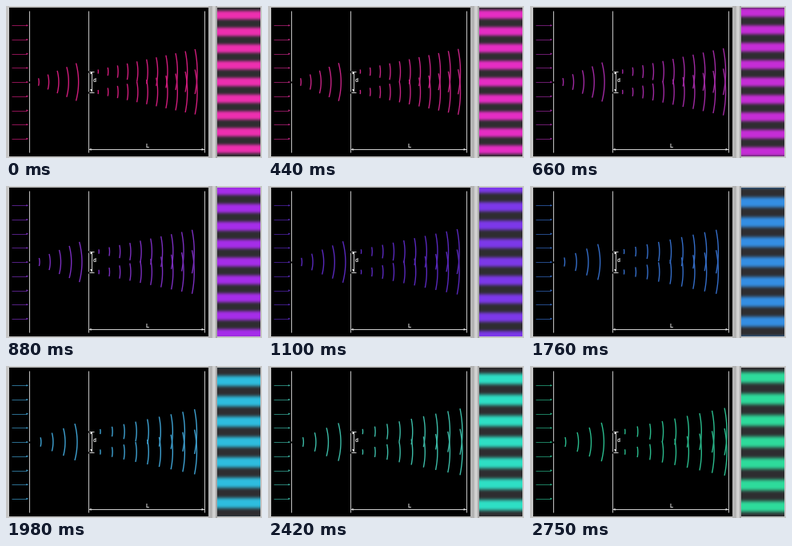
Recreate the animation shown at these times as a matplotlib script. Size 320 px wide and 190 px high, loop 2860 ms.

```python
import numpy as np
import matplotlib.pyplot as plt
from matplotlib.animation import FuncAnimation
from matplotlib.patches import Rectangle, Polygon

W, H, DPI = 320, 190, 100
FRAMES, STEP_MS = 26, 110
PX = 72 / DPI  # points per pixel

MID = 95
SCREEN_1, SCREEN_2, SCREEN_3 = 28.8, 103, 248
SLITS = (82, 107.5)
GREY, INK = "#b4b4b4", "#e4e4e4"
DARK = np.array([46, 45, 48]) / 255

# Key times with wavelength, wave colour and fringe colour
KEYS = [0, 4, 8, 13, 18, 22, 25]
WAVELENGTH = [12.37, 12.5, 13.23, 14.2, 15.05, 15.55, 15.9]
WAVE_RGB = np.array([(205, 28, 122), (196, 36, 132), (122, 46, 190), (38, 30, 182),
                     (62, 160, 208), (60, 186, 166), (42, 186, 140)]) / 255
FRINGE_RGB = np.array([(238, 48, 176), (230, 46, 196), (166, 46, 234), (62, 72, 234),
                       (46, 190, 224), (46, 224, 198), (46, 220, 156)]) / 255

fig = plt.figure(figsize=(W / DPI, H / DPI), dpi=DPI, facecolor="#c6c6c6")
ax = fig.add_axes([0, 0, 1, 1])
ax.set_xlim(0, W)
ax.set_ylim(H, 0)
ax.axis("off")


def box(x0, y0, x1, y1, color):
    ax.add_patch(Rectangle((x0, y0), x1 - x0, y1 - y0, color=color, lw=0))


def line(x, y, width=1.0, color=INK, z=3):
    return ax.plot(x, y, color=color, lw=width * PX, zorder=z,
                   solid_capstyle="butt")[0]


def head(x, y, dx, dy, length=3, half=1.5, color=INK):
    """Arrow head with its tip at x, y, pointing along dx, dy."""
    bx, by = x - dx * length, y - dy * length
    points = [(x, y), (bx - dy * half, by + dx * half), (bx + dy * half, by - dx * half)]
    return ax.add_patch(Polygon(points, color=color, lw=0, zorder=4))


def barrier(x, gaps=()):
    edges = [6, *[g + s for g in gaps for s in (-1, 1)], 183]
    for top, bottom in zip(edges[::2], edges[1::2]):
        line([x, x], [top, bottom], 1.1, "#b8b8b8")


def label(x, y, text):
    ax.text(x, y, text, color=INK, fontsize=6.6 * PX, weight="bold",
            family="Liberation Sans", ha="center", va="center", zorder=5)


# Apparatus
box(4, 2, 253, 188, "black")
box(253, 0, 258, H, GREY)
box(258, 0, 262, H, "#d0d0d0")
box(262, 0, 264, H, "#a8a8a8")
barrier(SCREEN_1, [MID])
barrier(SCREEN_2, SLITS)
barrier(SCREEN_3)

# Dimensions d and L
line([106.5, 106.5], [82, 107], 0.9)
head(106.5, 82, 0, -1)
head(106.5, 107, 0, 1)
for y in (81.5, 107.5):
    line([104, 109.5], [y, y], 0.9)
label(110.8, 93.3, "d")
line([104, 247.5], [179.3, 179.3], 0.9)
head(103.6, 179.3, -1, 0)
head(247.6, 179.3, 1, 0)
label(177, 175.4, "L")

# Incoming rays
rays, ray_heads = [], []
for y in 24.3 + 17.7 * np.arange(9):
    rays.append(line([7, 26], [y, y], 0.9))
    ray_heads.append(head(28, y, 1, 0, 2.6, 1.2))

# Wavefronts: source x, source y, end of the region, spread, bulge
SOURCES = [(SCREEN_1, MID, 101.5, 0.38, 0.05)]
SOURCES += [(SCREEN_2, y, 247, 0.206, 0.021) for y in SLITS]
MAX_FRONTS = 12
fronts = [[line([], [], 1.4) for _ in range(MAX_FRONTS)] for _ in SOURCES]

rows = np.arange(2, 188) + 0.5
panel = ax.imshow(np.zeros((len(rows), 1, 3)), extent=(264, 318, 188, 2),
                  aspect="auto", interpolation="nearest", zorder=2)
ax.set_xlim(0, W)
ax.set_ylim(H, 0)

t = np.linspace(-1, 1, 25)


def blend(table, i):
    return np.array([np.interp(i, KEYS, channel) for channel in table.T])


def update(i):
    wave = np.interp(i, KEYS, WAVELENGTH)
    color = blend(WAVE_RGB, i)
    for ray, tip in zip(rays, ray_heads):
        ray.set_color(color * 0.75)
        tip.set_color(color)

    for (x, y, end, spread, bulge), arcs in zip(SOURCES, fronts):
        for n, arc in enumerate(arcs, 1):
            r = n * wave
            arc.set_visible(x + r < end)
            arc.set_color(color)
            arc.set_data(x + r * (1 - bulge * t**2), y + r * spread * t)

    glow = np.cos(np.pi * (rows - MID) / (1.69 * wave)) ** 2
    glow = glow * glow * (3 - 2 * glow)
    shade = DARK + glow[:, None] * (blend(FRINGE_RGB, i) - DARK)
    panel.set_data(shade[:, None, :])
    return []


anim = FuncAnimation(fig, update, frames=FRAMES, interval=STEP_MS,
                     repeat=True, repeat_delay=0, blit=False)
plt.show()
```
